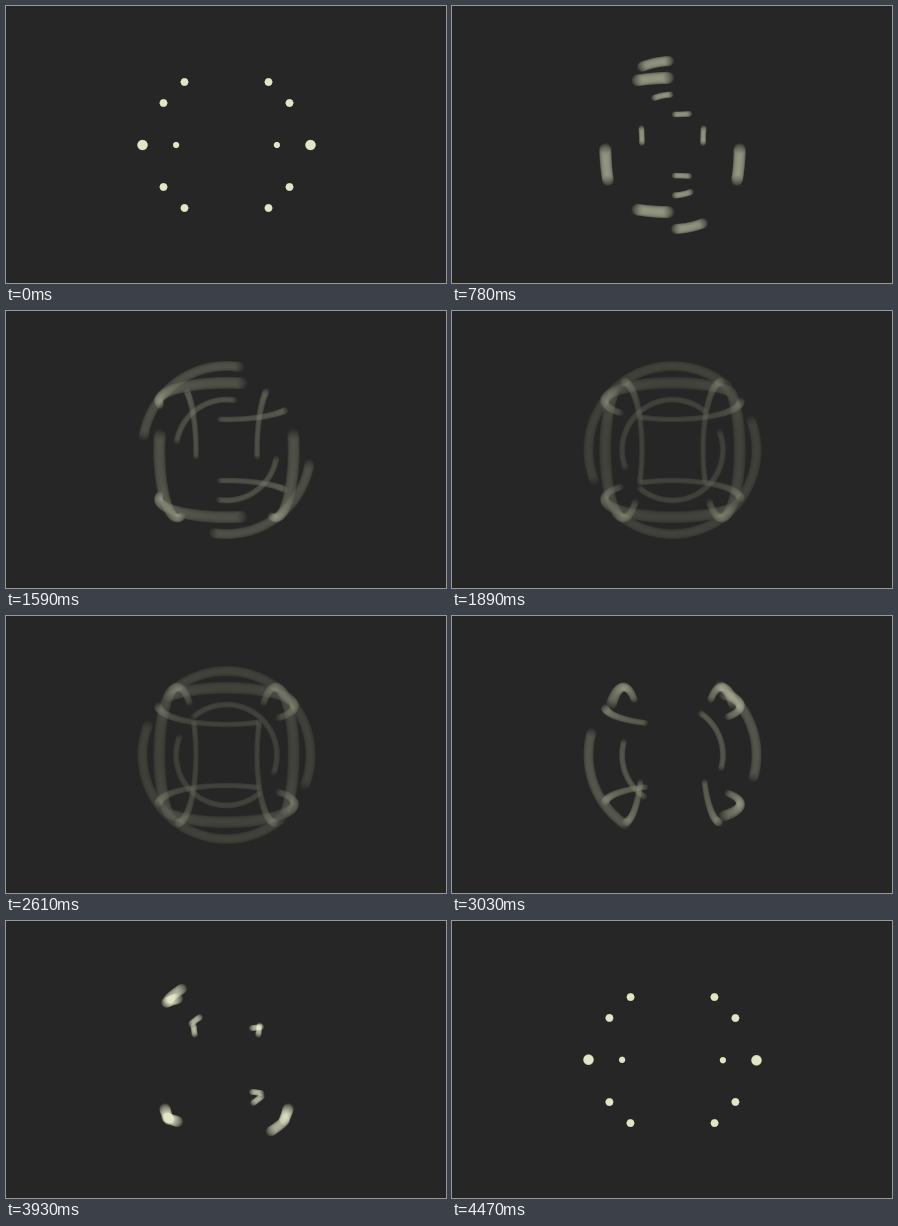
Animation, 440 px wide and 277 px high, one loop 4.5 s. Source, as an HTML page with a canvas:

```html
<!DOCTYPE html>
<html lang="en">
<head>
<meta charset="utf-8">
<title>Orbiting dots</title>
<style>
  html, body { margin: 0; width: 100%; height: 100%; overflow: hidden; background: #262626; }
  canvas { display: block; width: 440px; height: 277px; }
</style>
</head>
<body>
<canvas id="stage" width="440" height="277"></canvas>
<script>
const W = 440, H = 277, CX = 220.5, CY = 139;
const STEP = 30, FRAMES = 150, HALF = FRAMES / 2;
const RING = 63, OFFSET = 42, EYE = 168, DOT = 3.75;
const SHUTTER = 2.2, SAMPLES = 220, TURNS = 13, GAMMA = 2.2;
const BACK = [38, 38, 38], FORE = [226, 229, 198];

const ctx = document.getElementById('stage').getContext('2d');
const image = ctx.createImageData(W, H);
const pixels = new Uint32Array(image.data.buffer);
const light = new Float32Array(W * H);

// Colours for each exposure level, mixed in linear light.
const LEVELS = 4095;
const shades = Uint32Array.from({ length: LEVELS + 1 }, (_, i) => {
  const a = i / LEVELS;
  const [r, g, b] = BACK.map((c, k) => {
    const mix = c ** GAMMA * (1 - a) + FORE[k] ** GAMMA * a;
    return Math.round(mix ** (1 / GAMMA));
  });
  return (255 << 24 | b << 16 | g << 8 | r) >>> 0;
});

// Rotation in radians: slow start, fast middle, slow end.
function angle(frame) {
  const ease = x => Math.sign(x) * (x * x + 2 * Math.abs(x) ** 5) / 3;
  const x = frame / HALF;
  return Math.PI * TURNS * (x <= 1 ? ease(x) : 2 - ease(2 - x));
}

function addDot(x, y, z, weight) {
  const scale = EYE / (EYE - z);
  const px = CX + x * scale, py = CY + y * scale;
  const edge = DOT * scale + 0.5;
  const x0 = Math.floor(px - edge), x1 = Math.ceil(px + edge);
  const y0 = Math.floor(py - edge), y1 = Math.ceil(py + edge);
  for (let j = y0; j < y1; j++) {
    const dy = j + 0.5 - py;
    for (let i = x0; i < x1; i++) {
      const dx = i + 0.5 - px;
      const cover = edge - Math.sqrt(dx * dx + dy * dy);
      if (cover > 0) light[j * W + i] += weight * Math.min(1, cover);
    }
  }
}

// Six rings on the faces of a cube, two opposite dots on each.
function addDots(turn, weight) {
  const c = RING * Math.cos(turn), s = -RING * Math.sin(turn);
  for (const side of [-OFFSET, OFFSET]) {
    for (const d of [-1, 1]) {
      addDot(d * c, d * s, side, weight);
      addDot(side, d * c, d * s, weight);
      addDot(-d * c, side, d * s, weight);
    }
  }
}

function draw(frame) {
  light.fill(0);
  for (let i = 0; i < SAMPLES; i++) {
    const shift = ((i + 0.5) / SAMPLES - 0.5) * SHUTTER;
    addDots(angle(frame + shift), 1 / SAMPLES);
  }
  for (let i = 0; i < pixels.length; i++) {
    pixels[i] = shades[Math.round(Math.min(1, light[i]) * LEVELS)];
  }
  ctx.putImageData(image, 0, 0);
}

const start = performance.now();
let shown = -1;
function tick() {
  const frame = Math.floor((performance.now() - start) / STEP) % FRAMES;
  if (frame !== shown) draw(shown = frame);
  requestAnimationFrame(tick);
}
tick();
</script>
</body>
</html>
```
